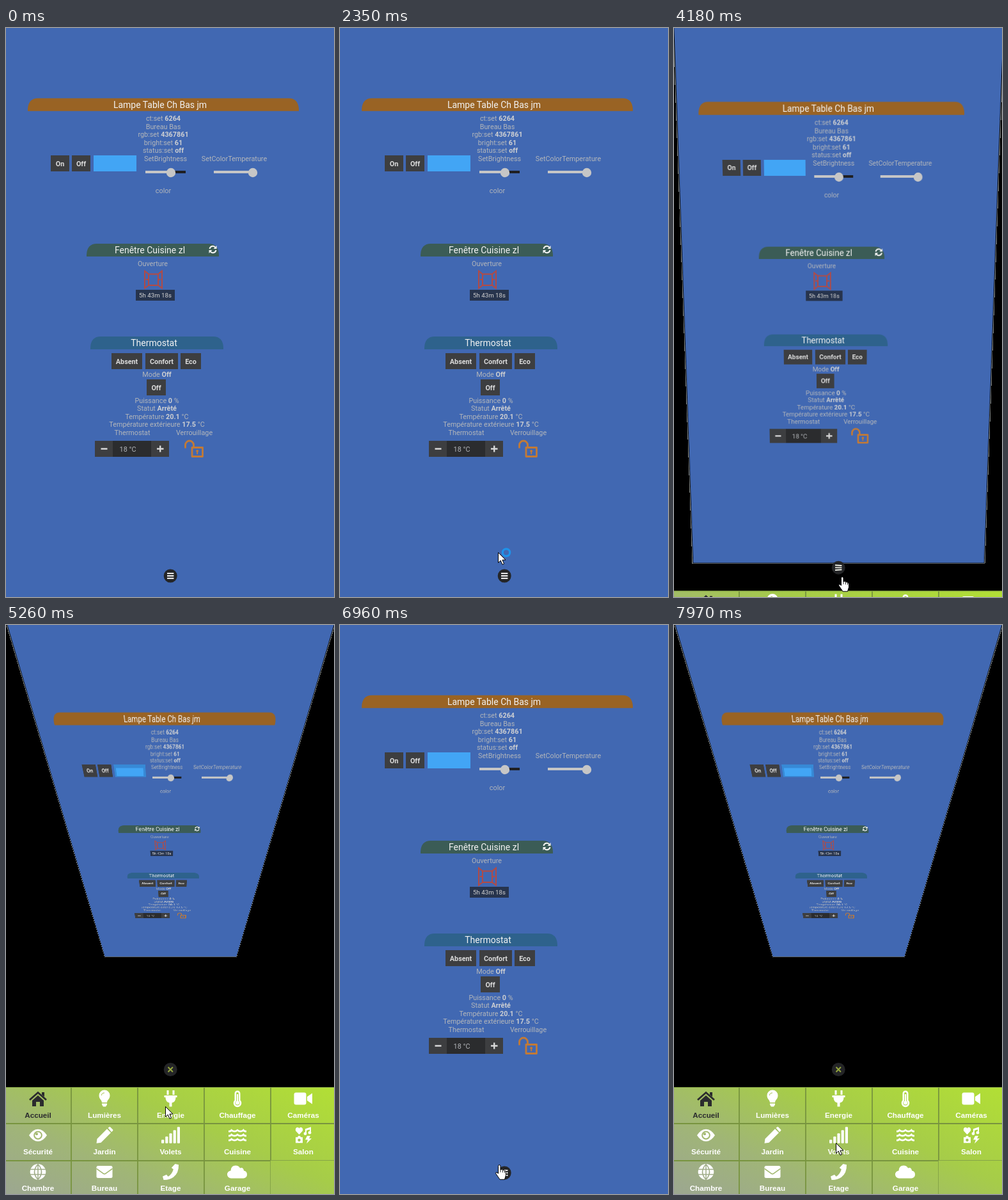
Animation, 513 px wide and 889 px high, one loop 8 s. Source, as an HTML page:

```html
<!DOCTYPE html>
<html lang="fr">
<head>
<meta charset="utf-8">
<title>Tableau domotique</title>
<style>
html, body { margin: 0; width: 100%; height: 100%; overflow: hidden; background: #000; }
#stage { position: absolute; left: 0; top: 0; width: 513px; height: 889px; overflow: hidden; perspective: 421px; perspective-origin: 257.5px 446.5px; }
#page { position: absolute; left: 0; top: -8px; width: 515px; height: 897px; background: #4168b2; transform-origin: 50% 0; }
#page.tilted { outline: 1px solid #858d92; outline-offset: 1px; }
svg { position: absolute; left: 0; top: 0; display: block; overflow: visible; }
#page svg { top: 8px; }
#page text { font: 10.8px Roboto, sans-serif; fill: #b3b6ba; text-anchor: middle; }
#page .b, #page .btn { font-weight: 700; fill: #cdcfd2; }
#page .btn { fill: #dcdcdc; }
#page .title { font-size: 14px; fill: #f2f2f2; }
#page .badge { font-size: 9.7px; fill: #d2d2d2; }
#menu { position: absolute; left: 0; top: 0; width: 513px; height: 171px;
  background: linear-gradient(24deg, #9ca692 0%, #a0b577 30%, #a6cc49 62%, #b2df35 100%); }
#menu text { font: bold 11.7px "Liberation Sans", Arial, sans-serif; text-anchor: middle; }
</style>
</head>
<body>
<div id="stage">
  <div id="page"></div>
  <div id="menu"></div>
  <svg id="over" width="513" height="889"></svg>
</div>
<script>
const $ = id => document.getElementById(id);
const svg = (w, h, body) => `<svg width="${w}" height="${h}">${body}</svg>`;
const rect = (x, y, w, h, fill, more = '') => `<rect x="${x}" y="${y}" width="${w}" height="${h}" fill="${fill}" ${more}/>`;
const circle = (x, y, r, fill) => `<circle cx="${x}" cy="${y}" r="${r}" fill="${fill}"/>`;
const line = (d, color, w, more = '') => `<path d="${d}" fill="none" stroke="${color}" stroke-width="${w}" ${more}/>`;
const text = (x, y, s, cls = '') => `<text x="${x}" y="${y}" class="${cls}">${s}</text>`;
const at = (x, y, body) => `<g transform="translate(${x} ${y})">${body}</g>`;

// Dashboard
const header = (x, y, w, color, tx, s) =>
  `<path d="M${x} ${y + 20}v-3q1-17 16-17h${w - 32}q15 0 16 17v3z" fill="${color}"/>` + text(tx, y + 15, s, 'title');
const button = (x, y, w, s) => rect(x, y, w, 25, '#3d3e40') + text(x + w / 2, y + 16.5, s, 'btn');
const value = (x, y, label, v, unit = '') => text(x, y, `${label}<tspan class="b">${v}</tspan>${unit}`);
const slider = (x, w, knob) => rect(x, 223, w, 4, '#1f1f22') + rect(x, 223, knob - x, 4, '#c6c6c6') + circle(knob, 226, 7.2, '#c6c6c6');
const sync = '<g fill="none" stroke="#f4f4f4" stroke-width="2"><path d="M-5-1A5 5 0 0 1 4-3M5 1A5 5 0 0 1-4 3"/></g>' +
  '<path d="M6-6v5h-5zM-6 6v-5h5z" fill="#f4f4f4"/>';

$('page').innerHTML = svg(513, 889, [
  header(34, 109.7, 424, '#996324', 241, 'Lampe Table Ch Bas jm'),
  value(246, 145, 'ct:set ', '6264'),
  text(246, 158, 'Bureau Bas'),
  value(246, 170, 'rgb:set ', '4367861'),
  value(246, 183, 'bright:set ', '61'),
  value(246, 195, 'status:set ', 'off'),
  button(70, 199, 29, 'On'), button(103, 199, 29, 'Off'),
  rect(137, 199, 67, 25, '#42a5f5'),
  '<g id="bevel">' + rect(137, 199, 67, 25, '#3789d6') + rect(141, 206, 58, 16, '#42a5f5') + '</g>',
  text(249.5, 208, 'SetBrightness'), text(357, 208, 'SetColorTemperature'),
  slider(218, 63, 258), slider(325, 61, 386),
  text(246, 258, 'color'),

  header(126, 337, 207, '#3b5c56', 225, 'Fenêtre Cuisine zl'),
  at(323.5, 346, sync),
  text(229.5, 372, 'Ouverture'),
  line('M223 384.5h15v17.5h-15zM223 384.5l-6-5v27l6-4.5M238 384.5l6-5v27l-6-4.5M219 393h3M239 393h3', '#b54a42', 1.9),
  rect(203, 409, 61, 17, '#27344d'), text(233.5, 421, '5h 43m 18s', 'badge'),

  header(132, 482, 208, '#2e628c', 231.5, 'Thermostat'),
  button(165, 508, 48, 'Absent'), button(218, 508, 51, 'Confort'), button(273, 508, 32, 'Eco'),
  value(236, 545, 'Mode ', 'Off'),
  button(220, 549, 30, 'Off'),
  value(236, 586, 'Puissance ', '0', ' %'),
  value(236, 598, 'Statut ', 'Arrêté'),
  value(236, 611, 'Température ', '20.1', ' °C'),
  value(236, 623, 'Température extérieure ', '17.5', ' °C'),
  text(197.5, 636, 'Thermostat'), text(294.5, 636, 'Verrouillage'),
  rect(139, 645, 116, 25, '#3d3e40'), rect(167, 645, 60, 25, '#2b2c2e'),
  line('M148.500 657.500h10M236 657.500h10.500M241.200 652.500v10', '#d8d8d8', 2.4),
  text(190.5, 662, '18 °C'),
  line('M280.500 656.500v-5a6.500 6.500 0 0 1 13 0v4M291 655.500h16.500v14h-16.500z', '#c37a35', 2.8, 'stroke-linejoin="round"'),
  circle(299.2, 661, 2, '#c37a35'), line('M299.200 661v5', '#c37a35', 1.8)
].join(''));

// Menu icons, each centred on 0,0
const W = '#fff';
const fill = (d, c = W) => `<path d="${d}" fill="${c}"/>`;
const gap = '#a6c456';
const icons = {
  Accueil: fill('M0-5L9 3v9h-6v-7h-6v7h-6v-9zM6-10h4v7l-4-3z', '#2b2b2e') + line('M-13 2L0-9.500 13 2', '#2b2b2e', 2.8),
  'Lumières': fill('M-4 6C-4 2-8.500 1-8.500-5a8.500 8.500 0 0 1 17 0C8.500 1 4 2 4 6zM-4 7.500h8v2l-2 3h-4l-2-3z') + line('M-4.500-5Q-4.500-9 0-9', gap, 1),
  Energie: fill('M-6-13h3v7h-3zM3-13h3v7h-3zM-10-5h20v3h-2Q8 5 2 6.500v6h-4v-6Q-8 5-8-2h-2z'),
  Chauffage: line('M-3.200 3V-8a3.200 3.200 0 0 1 6.400 0V3a5 5 0 1 1-6.400 0z', W, 2.6) + circle(0, 6.5, 3, W) + line('M0-7V6', W, 2),
  'Caméras': `<rect x="-14.500" y="-9.500" width="19" height="19" rx="3" fill="${W}"/>` + fill('M6-3L14-8.500v17L6 3z'),
  'Sécurité': fill('M-14 0Q-8-9.500 0-9.500T14 0Q8 9.500 0 9.500T-14 0z') + circle(0, 0, 6.8, '#a2b86d') + circle(0, 0, 4.8, W) + circle(-2, -2, 2, '#a2b86d'),
  Jardin: fill('M-12.500 12.500l1-7L4-10l6 6L-5.500 11.500zM5.500-11.500l2-1.500q1-.500 2 .500l3.500 3.500q1 1 0 2l-2 2z'),
  Volets: [0, 1, 2, 3, 4].map(i => rect(-14.5 + i * 6.2, 7 - i * 5, 4.2, 5.5 + i * 5, W, 'rx="1"')).join(''),
  Cuisine: [-7, 0, 7].map(y => line(`M-14 ${y + 1}q3.500 0 4.700-2q4.700 4 9.300 0q4.700 4 9.300 0q1.200 2 4.700 2`, W, 2.7)).join(''),
  Salon: fill('M-6.500-1L-12-7Q-13-12-9-12.500-7-12.500-6.500-10.500-6-12.500-4-12.500 0-12-1-7zM3-10l9-3v9h-2v-5l-5 1.500v5H3z') + circle(3, -2.5, 2.4, W) + circle(10, -4, 2.4, W) +
    fill('M-12 3h3l1-2h3l1 2h3v9h-11zM6 1h5l-2 4h4L5 13l2-6H3z') + circle(-6.5, 7.5, 2.2, gap),
  Chambre: circle(0, 0, 12.3, W) + line('M-12-4H12M-12 4H12M0-12V12M0-12Q-11 0 0 12Q11 0 0-12', '#9fac88', 1.5),
  Bureau: `<rect x="-12.500" y="-9.500" width="25" height="19" rx="2.500" fill="${W}"/>` + line('M-12.500-5L-2 2.500Q0 4 2 2.500L12.500-5', '#a2b870', 1.6),
  Etage: fill('M7-12.500l5.500 1.300Q13 2 4 8.500-3 13-11 12.500l-1.500-5.500 6-2.700 2.500 3Q2 4 4.300-4l-3-2.500z'),
  Garage: fill('M-9.500 10A6 6 0 0 1-10.500-2Q-10-10-3-10 2-10 4-6 9-8 10-2 15-1 15 4T9.500 10z')
};
const colX = [50, 154, 257.5, 362, 465];
const cells = Object.entries(icons).map(([name, icon], i) => {
  const x = colX[i % 5], y = Math.floor(i / 5) * 57.2;
  return at(x, 18 + y, icon) + `<text x="${x}" y="${48 + y}" fill="${i ? W : '#2b2b2e'}">${name}</text>`;
});
$('menu').innerHTML = svg(513, 171,
  line('M102 0v171M206 0v171M310 0v171M414 0v115M0 57h513M0 115h414', '#78943f', 1.8) +
  line('M0 .500h513M414 114.500h99M413.500 115v56', '#86a547', 1) + cells.join(''));

// Round toggle and pointer
const bar = id => `<rect id="${id}" x="-5.200" y="-1" width="10.400" height="2"/>`;
const arrow = '<path d="M.500.500v16l3.700-3.500 2.800 6.300 2.600-1.200-2.700-6h5.100z" fill="#fff" stroke="#000" stroke-width="1"/>';
const hand = '<path d="M4.500 14V2.500q0-2 1.700-2t1.800 2V8q3-1.200 3.500.800 2.500-.800 3 1 2-.300 2 2v5l-2 6.500H7L1 14.500q-1-2.500 1-2.500z" fill="#fff" stroke="#000" stroke-width="1"/>' +
  line('M8 8v4M11.500 9v3.500M14.500 10v3', '#000', .8);
$('over').innerHTML =
  `<g id="toggle">${circle(0, 0, 10.5, '#242527')}<g id="bars">${bar('top')}${bar('mid')}${bar('low')}</g></g>` +
  `<g id="pointer"><g id="arrow">${arrow}</g><circle id="ring" cx="13" cy="0.500" r="5.700" fill="none" stroke="#1e93ea" stroke-width="3.200"/><g id="hand">${hand}</g></g>`;

// Motion
const LOOP = 8000, SLIDE = 290;
// start, held beat, beat length, opens?
const slides = [[4154, 4180, 50, 1], [6155, 6330, 60, 0], [7428, 7520, 40, 1]];
// time, x, y, pointer shape
const track = [
  [0, 396, 876, ''], [1120, 396, 876, 'arrow'], [1500, 310, 846, 'arrow'], [1880, 224, 821, 'arrow'],
  [1940, 218, 824, 'busy'], [2350, 247, 819, 'busy'], [2400, 247, 819, 'busy'], [2700, 272, 872, 'arrow'],
  [2760, 286, 878, 'arrow'], [3100, 292, 870, 'arrow'], [3520, 264, 858, 'arrow'],
  [3570, 258, 857, 'hand'], [3730, 257, 857, 'hand'], [4949, 257, 857, 'hand'],
  [4950, 261, 857, 'arrow'], [5260, 249, 752, 'arrow'], [5330, 249, 752, 'arrow'],
  [5500, 242, 689, 'hand'], [5720, 242, 689, 'hand'], [5890, 246, 693, 'hand'],
  [6180, 247, 695, 'arrow'], [6330, 255.5, 718, 'arrow'], [6390, 255.5, 718, 'arrow'], [6800, 249, 860, 'arrow'],
  [6960, 243, 843, 'hand'], [7249, 243, 843, 'hand'], [7250, 251, 843, 'hand'], [7410, 251, 843, 'hand'],
  [7440, 253, 855, 'arrow'], [7560, 253, 855, 'arrow'], [7930, 253, 809, 'arrow'], [LOOP, 253, 809, 'arrow']
];

const bez = (u, a, b) => 3 * u * (1 - u) ** 2 * a + 3 * u * u * (1 - u) * b + u ** 3;
function ease(p) {
  if (p <= 0 || p >= 1) return p <= 0 ? 0 : 1;
  let lo = 0, hi = 1;
  for (let i = 0; i < 24; i++) {
    const m = (lo + hi) / 2;
    if (bez(m, .25, .25) < p) lo = m; else hi = m;
  }
  return bez(lo, .1, 1);
}

function openness(t) {
  let f = 0;
  for (const [start, beat, step, opens] of slides) {
    const held = beat + Math.floor((t - beat) / step) * step;
    if (held < start) break;
    const e = ease((held - start) / SLIDE);
    f = opens ? e : 1 - e;
  }
  return f;
}

const move = (id, s) => $(id).setAttribute('transform', s);
const show = (id, on) => { $(id).style.display = on ? '' : 'none'; };
const mix = (a, b, f) => Math.round(a + (b - a) * f);

function drawPointer(t) {
  let i = 0;
  while (i < track.length - 2 && track[i + 1][0] <= t) i++;
  const [t0, x0, y0, kind] = track[i], [t1, x1, y1] = track[i + 1];
  const step = 48, p = Math.floor((t - t0) / step) * step / (t1 - t0);
  move('pointer', `translate(${Math.round(x0 + (x1 - x0) * p)} ${Math.round(y0 + (y1 - y0) * p)})`);
  show('arrow', kind === 'arrow' || kind === 'busy');
  show('ring', kind === 'busy');
  show('hand', kind === 'hand');
}

function draw(t) {
  const f = openness(t);
  $('page').style.transform = f ? `rotateX(${-45 * f}deg)` : 'none';
  $('page').classList.toggle('tilted', f > 0);
  show('bevel', f > .97);
  $('menu').style.transform = `translateY(${722 + 171 * (1 - f)}px)`;
  move('toggle', `translate(257.2 ${856 - 161.5 * f})`);
  const y = 3.8 * (1 - f);
  move('top', `translate(0 ${-y}) rotate(${45 * f})`);
  move('low', `translate(0 ${y}) rotate(${-45 * f})`);
  $('mid').style.opacity = Math.max(0, 1 - 2 * f);
  $('bars').setAttribute('fill', `rgb(${mix(245, 150, f)},${mix(245, 168, f)},${mix(245, 62, f)})`);
  drawPointer(t);
}

const begin = performance.now();
function tick() {
  draw((performance.now() - begin) % LOOP);
  requestAnimationFrame(tick);
}
tick();
</script>
</body>
</html>
```
